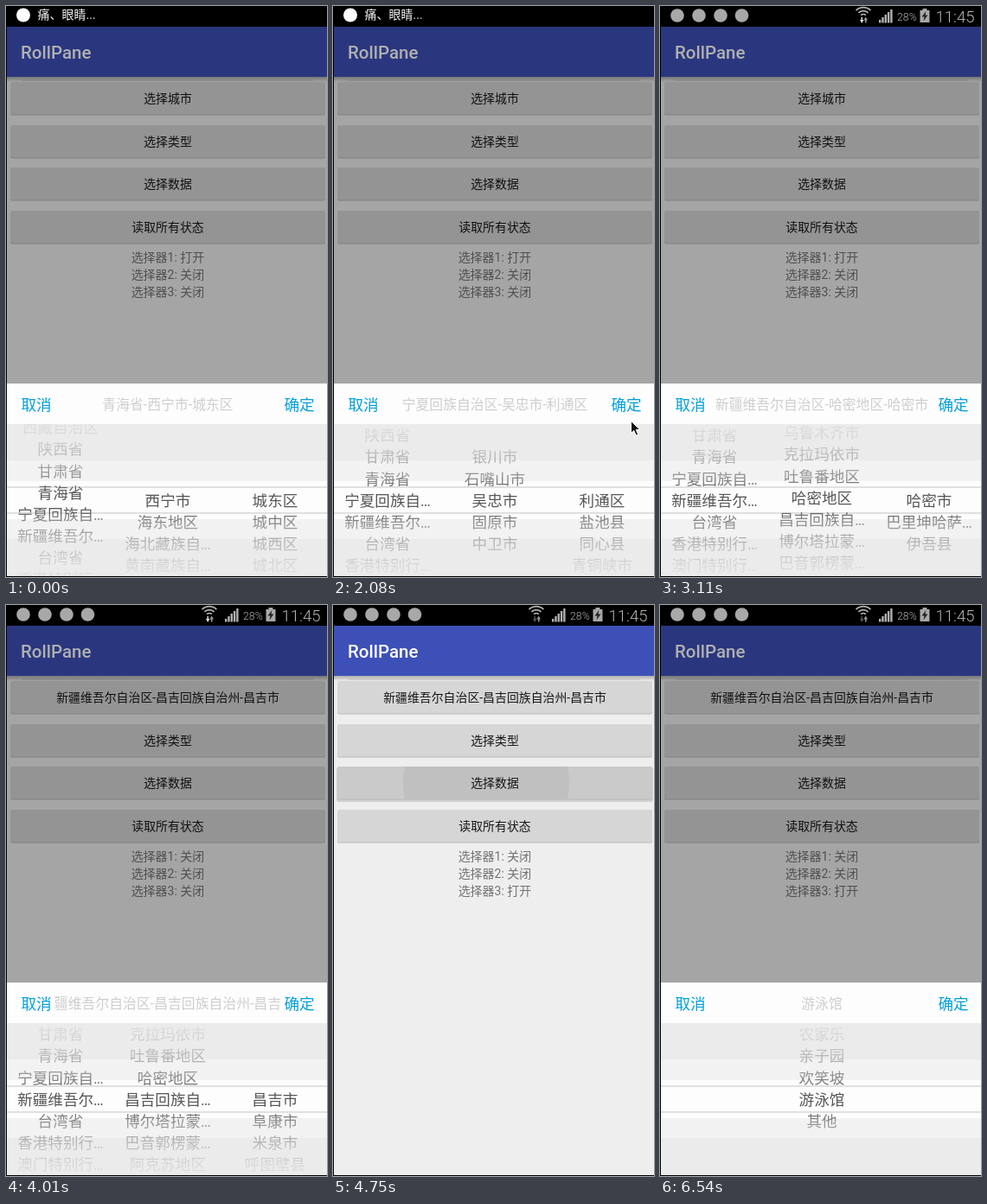
Animation, 371 px wide and 661 px high, one loop 8000 ms. Source, as an HTML page:

```html
<!DOCTYPE html>
<html lang="zh-CN">
<head>
<meta charset="utf-8">
<title>RollPane</title>
<style>
  html, body { margin: 0; width: 100%; height: 100%; overflow: hidden; background: #000; }
  svg { display: block; width: 371px; height: 661px; }
  text { font-family: Roboto, "Noto Sans CJK SC", "Noto Sans CJK", sans-serif; white-space: pre; }
</style>
</head>
<body>
<svg viewBox="0 0 371 661">
  <defs>
    <linearGradient id="shade" x1="0" x2="0" y1="82" y2="88" gradientUnits="userSpaceOnUse">
      <stop offset="0" stop-opacity=".28"/><stop offset="1" stop-opacity="0"/>
    </linearGradient>
    <linearGradient id="fade" x1="0" x2="0" y1="484" y2="660" gradientUnits="userSpaceOnUse"></linearGradient>
    <clipPath id="barClip"><rect width="371" height="24"/></clipPath>
    <clipPath id="appClip"><rect x="1" width="370" height="660"/></clipPath>
    <clipPath id="titleClip"><rect x="56" y="440" width="262" height="42"/></clipPath>
    <clipPath id="wheelClip"><rect x="1" y="484" width="370" height="176"/></clipPath>
    <clipPath id="pressClip"><rect x="5" y="187" width="364" height="38" rx="2"/></clipPath>
  </defs>
  <g id="view"></g>
</svg>
<script>
const LOOP = 8000, ROW = 25.1, MID = 572;
const COLS = [63, 187, 311];

const provinces = '西藏自治区 陕西省 甘肃省 青海省 宁夏回族自治区 新疆维吾尔自治区 台湾省 香港特别行政区 澳门特别行政区'.split(' ');

// province -> cities, each "city:district,district"
const regions = {
  青海省: ['西宁市:城东区,城中区,城西区,城北区,大通回族土族自治县', '海东地区', '海北藏族自治州', '黄南藏族自治州', '海南藏族自治州'],
  宁夏回族自治区: ['银川市:兴庆区,西夏区,金凤区,永宁县,贺兰县', '石嘴山市:大武口区,惠农区,平罗县',
    '吴忠市:利通区,盐池县,同心县,青铜峡市', '固原市', '中卫市'],
  新疆维吾尔自治区: ['乌鲁木齐市:天山区,沙依巴克区,新市区,水磨沟区', '克拉玛依市:独山子区,克拉玛依区,白碱滩区,乌尔禾区',
    '吐鲁番地区:吐鲁番市,鄯善县,托克逊县', '哈密地区:哈密市,巴里坤哈萨克自治县,伊吾县',
    '昌吉回族自治州:昌吉市,阜康市,米泉市,呼图壁县', '博尔塔拉蒙古自治州', '巴音郭楞蒙古自治州', '阿克苏地区']
};
const places = ['农家乐', '亲子园', '欢笑坡', '游泳馆', '其他'];

// a, b: wheel positions; c: place wheel; out: panel offset 0..1; bar: status swap 0..1
const steps = [
  [0, { a: 3.36, b: 0, c: 0, out: 0, dim: 1, bar: 0, open: 1, press: 0, link: 1, done: 0, mouse: 0 }],
  [150, { a: 3.7 }], [290, { a: 3.92 }], [440, { a: 4 }],
  [1190, { b: .15 }], [1340, { b: .6 }], [1490, { b: 1.15 }], [1640, { b: 1.6 }],
  [1780, { b: 1.88 }], [1930, { b: 2 }], [2080, { mouse: 1 }], [2230, { mouse: 0 }],
  [2380, { a: 4.3 }], [2530, { a: 4.85, b: 0, bar: .5 }], [2670, { a: 5, bar: 1 }],
  [2820, { b: 1.3 }], [2970, { b: 2.6 }], [3110, { b: 3.12 }], [3260, { b: 3.6 }],
  [3410, { b: 3.95 }], [3560, { b: 4, link: 0 }],
  [4010, { open: 0, done: 1, link: 1 }], [4160, { out: .45, dim: .5 }], [4310, { out: 1, dim: 0 }],
  [4450, { link: 0 }], [4600, { press: 40 }], [4750, { press: 96, open: 3 }],
  [4900, { press: 0, out: .35, dim: .65, link: 1 }], [5040, { out: 0, dim: 1 }], [5490, { link: 0 }],
  [6090, { c: .5 }], [6240, { c: 1.6 }], [6390, { c: 2.6 }], [6540, { c: 3 }]
];

const rect = (x, y, w, h, fill, more = '') =>
  `<rect x="${x}" y="${y}" width="${w}" height="${h}" fill="${fill}" ${more}/>`;
const dot = (x, y, r, fill) => `<circle cx="${x}" cy="${y}" r="${r}" fill="${fill}"/>`;
const text = (x, y, size, fill, str, more = '') =>
  `<text x="${x}" y="${y}" font-size="${size}" fill="${fill}" ${more}>${str}</text>`;
// centred on (x, y)
const label = (x, y, size, fill, str, more = '') =>
  text(x, y + size * .38, size, fill, str, 'text-anchor="middle" ' + more);
const group = (inner, more) => `<g ${more}>${inner}</g>`;
const short = s => s.length > 5 ? s.slice(0, 5) + '…' : s;

function fadeStops() {
  const half = [[0, .08], [13, .13], [38, .34], [63, .64], [76, .96], [88, 1]];
  const all = half.concat(half.slice(0, -1).reverse().map(([y, o]) => [176 - y, o]));
  return all.map(([y, o]) => `<stop offset="${y / 176}" stop-color="#545454" stop-opacity="${o}"/>`).join('');
}

function statusBar(s) {
  const ticker = dot(20, 10.5, 8, '#fff') + text(36.5, 15, 14, '#f4f4f4', '痛、眼睛...');
  const grey = '#a8a8a8';
  let icons = [20, 45, 70, 94.5].map(x => dot(x, 11, 7.8, grey)).join('');
  for (const r of [4, 8, 12]) {
    const d = r * .7;
    icons += `<path d="M${235 - d} ${13.5 - d}A${r} ${r} 0 0 1 ${235 + d} ${13.5 - d}" fill="none" stroke="#b4b4b4" stroke-width="1.7"/>`;
  }
  icons += `<path d="M231 16h1.5v-3h1.5v3h1.5l-2.250 4z" fill="${s.link ? '#ddd' : '#555'}"/>`;
  icons += '<path d="M235.500 16.500l2.250-4 2.250 4h-1.500v3h-1.500v-3z" fill="#999"/>';
  for (let i = 0; i < 5; i++) icons += rect(253 + i * 3.3, 16 - i * 3, 2.4, 3.5 + i * 3, '#b0b0b0');
  icons += text(274, 16.5, 12.3, '#b4b4b4', '28%', 'font-weight="300"');
  icons += rect(303.5, 3, 5, 2, grey) + rect(300.5, 5, 11, 14, grey);
  icons += '<path d="M307.500 6l-5 6.500h3l-1 5 5-7h-3z" fill="#222"/>';
  icons += text(318.5, 19, 18.5, '#b4b4b4', '11:45', 'font-weight="300"');
  return group(group(ticker, `transform="translate(0 ${-24 * s.bar})"`) +
    group(icons, `transform="translate(0 ${24 - 24 * s.bar})"`), 'clip-path="url(#barClip)"');
}

function button(i, str, press) {
  const y = [88, 138, 187, 237][i];
  let out = press ? rect(4, y + 1, 366, 40, '#000', 'rx="3" opacity=".13"') : '';
  out += rect(5, y + 1, 364, 37.5, '#bababa', 'rx="2"') + rect(5, y, 364, 37.5, press ? '#cacaca' : '#d6d6d6', 'rx="2"');
  if (press) out += group(dot(177, 206, press, '#c0c0c0'), 'clip-path="url(#pressClip)"');
  return out + label(187, y + 19, 13.9, '#161616', str);
}

function page(s, chosen) {
  const names = [chosen || '选择城市', '选择类型', '选择数据', '读取所有状态'];
  return rect(1, 24, 370, 636, '#eee') + rect(1, 24, 370, 58, '#3d50b8') + rect(1, 82, 370, 6, 'url(#shade)') +
    rect(18, 85, 337, 2, '#000', 'opacity=".08"') +
    text(17, 61, 20.5, '#fff', 'RollPane', 'font-weight="500"') +
    names.map((n, i) => button(i, n, i === 2 ? s.press : 0)).join('') +
    [1, 2, 3].map(n => label(187, 271.5 + n * 19.6, 14, '#737373',
      `选择器${n}: ${s.open === n ? '打开' : '关闭'}`)).join('');
}

function wheel(x, list, pos) {
  return list.map((str, i) => {
    const y = MID + (i - pos) * ROW;
    return y > 470 && y < 674 ? label(x, y, 17.6, 'url(#fade)', short(str)) : '';
  }).join('');
}

function panel(title, wheels, out) {
  const bands = [[484, 42, '#ebebeb'], [526, 24, '#f2f2f2'], [550, 44, '#fdfdfd'], [594, 23, '#f2f2f2'], [617, 43, '#ebebeb']];
  return group(rect(1, 437, 370, 47, '#fdfdfd') +
    bands.map(([y, h, c]) => rect(1, y, 370, h, c)).join('') +
    rect(1, 556, 370, 2, '#e0e0e0') + rect(1, 586, 370, 2, '#e0e0e0') +
    label(35, 461.5, 17.6, '#009fdc', '取消') + label(339, 461.5, 17.6, '#009fdc', '确定') +
    group(label(187, 461, 15.85, '#cecece', title), 'clip-path="url(#titleClip)"') +
    group(wheels, 'clip-path="url(#wheelClip)"'), `transform="translate(0 ${224 * out})"`);
}

function cityPick(s) {
  const prov = provinces[Math.round(s.a)];
  const cities = regions[prov].map(c => c.split(':'));
  const [city, list = city] = cities[Math.round(s.b)];
  const areas = list.split(',');
  return {
    title: [prov, city, areas[0]].join('-'),
    wheels: wheel(COLS[0], provinces, s.a) + wheel(COLS[1], cities.map(c => c[0]), s.b) + wheel(COLS[2], areas, 0)
  };
}

function draw(s, t) {
  const pick = cityPick(s);
  const shown = t < 4500 ? pick : { title: places[Math.round(s.c)], wheels: wheel(COLS[1], places, s.c) };
  let out = page(s, s.done && pick.title);
  if (s.dim) out += rect(1, 24, 370, 636, '#000', `opacity="${.31 * s.dim}"`);
  if (s.out < 1) out += panel(shown.title, shown.wheels, s.out);
  if (s.mouse) out += '<path d="M344.500 480.500v14l3.300-3 2.400 5.500 2.500-1-2.400-5.400h4.500z" fill="#111" stroke="#fff"/>';
  return group(out, 'clip-path="url(#appClip)"') + statusBar(s);
}

const view = document.getElementById('view');
document.getElementById('fade').innerHTML = fadeStops();
let last = -1;

function frame() {
  const t = performance.now() % LOOP;
  const past = steps.filter(([at]) => at <= t);
  if (past.length !== last) {
    last = past.length;
    view.innerHTML = draw(Object.assign({}, ...past.map(p => p[1])), t);
  }
  requestAnimationFrame(frame);
}
frame();
</script>
</body>
</html>
```
